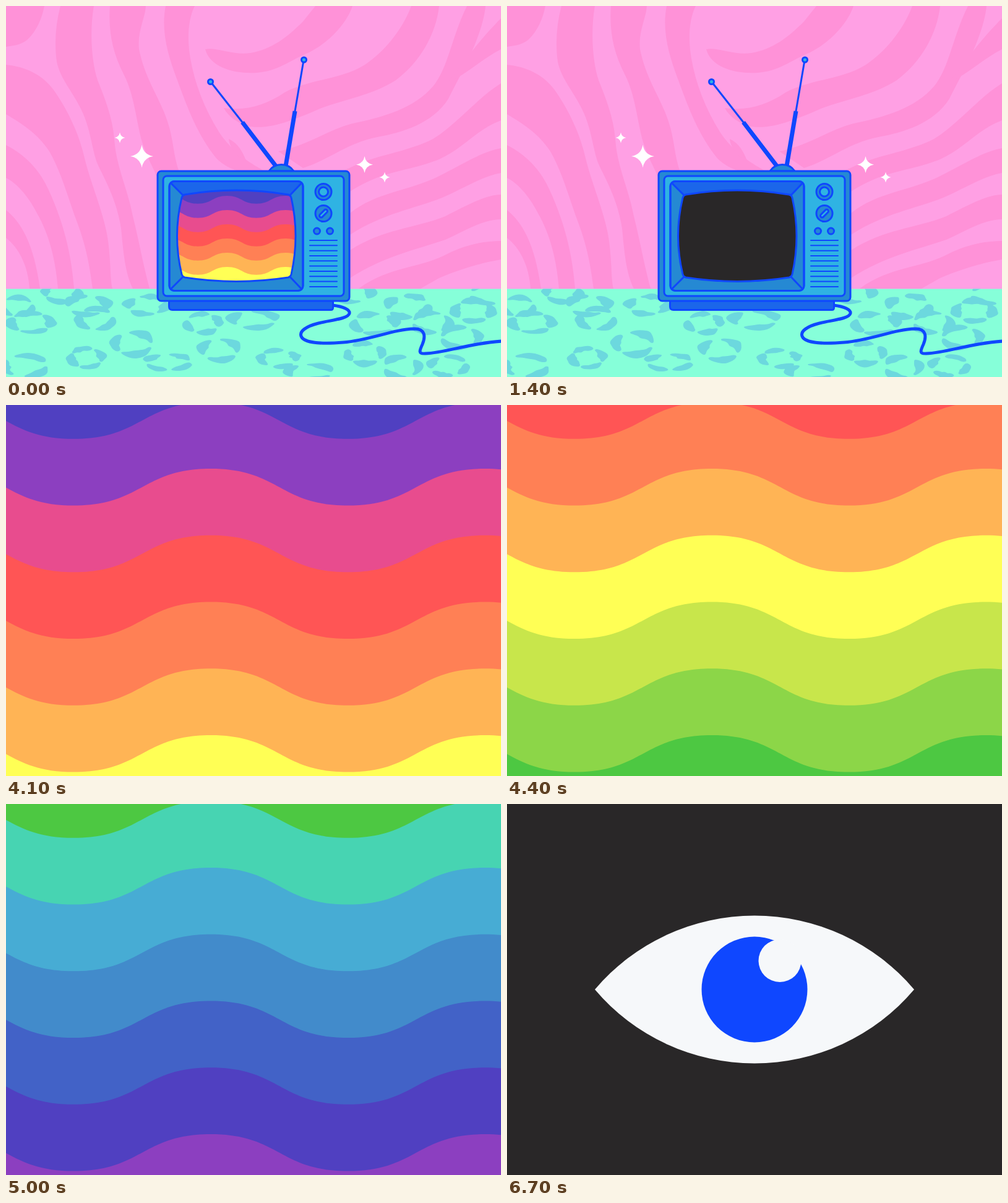
Animation of 800 by 600 pixels, one loop 8200 ms. Source, as an HTML page:

```html
<!DOCTYPE html>
<html lang="en">
<head>
<meta charset="utf-8">
<title>Television</title>
<style>
  html, body { margin: 0; width: 100%; height: 100%; overflow: hidden; background: #292728; }
  svg { display: block; width: 100vw; height: 100vh; }
  .line { fill: none; stroke: #0f47ff; stroke-width: 3; stroke-linecap: round; stroke-linejoin: round; }
  .mid { fill: #2589d3; }
  .light { fill: #2fb3e3; }
  .deep { fill: #1b66ea; }
</style>
</head>
<body>
<svg viewBox="0 0 800 600">
  <defs>
    <path id="glass" d="M289 305Q372 291 456 305Q460 306 461 310Q475 372 461 434Q460 438 456 439Q372 452 289 439Q285 438 284 434Q269 372 284 310Q285 306 289 305Z"/>
    <clipPath id="glassClip"><use href="#glass"/></clipPath>
  </defs>

  <rect width="800" height="600" fill="#ffa0e4"/>
  <g fill="#ff92d8">
    <path d="M0 0H62C58 20 50 40 34 55 22 64 10 64 0 66Z"/>
    <path d="M88 0C80 30 78 60 82 90 88 120 110 140 125 175 138 205 140 240 150 260 165 290 180 320 186 360 190 400 192 430 205 457H232C222 420 215 380 205 340 195 290 178 260 175 215 172 180 160 150 148 120 138 90 135 40 142 0Z"/>
    <path d="M0 95C30 98 60 110 80 140 100 170 118 205 128 250 138 290 160 340 165 380 170 420 168 440 172 457H140C135 420 130 390 115 350 100 310 90 270 70 235 50 205 25 190 0 175Z"/>
    <path d="M0 225C30 240 55 265 70 300 88 340 105 390 110 457H84C80 410 70 370 50 335 35 305 15 285 0 278Z"/>
    <path d="M0 330C25 350 45 385 55 457H38C36 420 20 390 0 375Z"/>
    <path d="M168 0C165 40 172 75 190 110 208 145 210 185 220 220 228 245 238 262 246 280H285C270 250 272 220 262 190 250 150 225 120 215 70 212 40 225 20 226 0Z"/>
    <path d="M258 0C250 40 262 80 275 115 290 155 305 200 335 240 345 255 365 265 380 268H420C395 255 365 235 345 205 320 165 305 125 298 85 292 50 295 20 305 0Z"/>
    <path d="M322 70C340 66 365 80 395 76 430 70 455 50 480 25L500 0H560C550 30 520 60 490 75 455 90 440 105 405 108 370 110 330 100 322 70Z"/>
    <path d="M352 165C390 170 420 160 450 140 490 118 540 120 580 95 610 75 640 40 655 0H700C695 45 670 90 630 120 590 145 550 150 510 165 470 182 430 200 395 195 375 190 360 180 352 165Z"/>
    <path d="M360 215C375 222 382 235 388 250 375 246 362 232 360 215Z"/>
    <path d="M440 235C490 225 520 200 560 190 610 180 660 165 690 130 715 100 720 50 745 0H775C770 50 735 110 715 150 690 190 640 205 600 212 550 222 520 250 480 262Z"/>
    <path d="M712 125C735 100 755 65 800 20V70C770 85 745 110 712 125Z"/>
    <path d="M540 270C590 240 640 240 690 215 730 190 760 150 800 125V185C760 200 740 230 700 248 650 268 610 265 556 300Z"/>
    <path d="M556 335C600 300 650 300 700 275 740 255 770 235 800 230V270C770 275 740 295 705 310 660 328 610 335 556 370Z"/>
    <path d="M556 395C610 360 660 360 710 340 740 325 775 305 800 305V345C770 345 740 365 710 378 660 395 610 405 556 440Z"/>
    <path d="M570 457C620 420 670 425 715 400 745 385 775 380 800 380V410C770 415 735 425 700 440L670 457Z"/>
  </g>
  <path id="sparkles" fill="#fff"/>

  <svg y="457.5" width="800" height="142.5" viewBox="0 457.5 800 142.5">
    <rect y="457" width="800" height="143" fill="#86ffd9"/>
    <path id="spots" fill="#6cd8de"/>
  </svg>

  <path class="line" style="stroke-width:5" d="M528 484C545 486 556 491 555 497C553 506 525 508 505 513C485 518 474 526 477 534C481 545 510 547 545 544C590 540 625 523 660 522C678 522 678 535 673 547C668 558 666 563 678 562C710 561 750 545 802 542"/>

  <g class="line">
    <path d="M331 123L382 188M481 88L467 170"/>
    <path stroke-linecap="butt" style="stroke-width:7;stroke-linecap:butt" d="M382 188L437 260M467 170L452 259"/>
    <circle class="light" cx="330.5" cy="122.5" r="4"/>
    <circle class="light" cx="481.5" cy="87" r="4"/>
    <path class="mid" d="M425 267Q432 256.5 445 256.5T465 267Z"/>
    <path class="deep" d="M263.5 476H528.500V488Q528.500 491.500 525 491.500H269Q263.500 491.500 263.500 486Z"/>
    <rect class="mid" x="245" y="267" width="310" height="210" rx="6"/>
    <rect class="light" x="254" y="275" width="292" height="194" rx="6"/>
    <rect class="mid" x="264" y="283.5" width="216" height="177" rx="8"/>
    <path class="deep" stroke="none" d="M267 286Q269 283.500 272 283.500H472Q475 283.500 477 286L460 306Q372 290 285 306Z"/>
    <path d="M267 287L286 306M477 287L459 306M267 457L286 438M477 457L459 438"/>
    <rect x="264" y="283.5" width="216" height="177" rx="8"/>
    <circle class="mid" cx="513" cy="300.500" r="13"/>
    <circle class="light" cx="513" cy="300.500" r="7.500"/>
    <circle class="mid" cx="513" cy="335.500" r="13"/>
    <rect class="light" x="505" y="332.700" width="16" height="5.600" rx="2.800" transform="rotate(-45 513 335.500)"/>
    <circle class="mid" cx="502.500" cy="364" r="5"/>
    <circle class="mid" cx="523.500" cy="364" r="5"/>
    <path id="grille" style="stroke-width:2"/>
  </g>

  <g clip-path="url(#glassClip)"><g id="small"></g></g>
  <use href="#glass" class="line"/>
  <g id="full"></g>
</svg>

<script>
const NS = "http://www.w3.org/2000/svg";
const DARK = "#292728", WHITE = "#f6f8fa", BLUE = "#0f47ff";
const RAINBOW = ["#5040c1", "#8c3fc0", "#e84c8e", "#ff5555", "#ff8055", "#ffb455", "#ffff55",
                 "#c8e64b", "#8cd648", "#4dc842", "#47d4b2", "#47acd4", "#428bcb", "#4262c7"];
const STEP = 100, SCENE = 4100, DARK_AT = 1400, EYE_AT = 2400;
const byId = id => document.getElementById(id);

function add(parent, tag, attrs = {}) {
  const node = document.createElementNS(NS, tag);
  for (const key in attrs) node.setAttribute(key, attrs[key]);
  return parent.appendChild(node);
}

// Closed curve through the midpoints of a polygon.
function smooth(points) {
  const mid = (p, q) => `${((p[0] + q[0]) / 2).toFixed(1)} ${((p[1] + q[1]) / 2).toFixed(1)}`;
  let d = "M" + mid(points[points.length - 1], points[0]);
  points.forEach((p, i) => {
    d += `Q${p[0].toFixed(1)} ${p[1].toFixed(1)} ${mid(p, points[(i + 1) % points.length])}`;
  });
  return d + "Z";
}

let seed = 11;
const random = () => (seed = (seed * 16807) % 2147483647) / 2147483647;

// One bent, ragged patch on the rim of a rosette.
function patch(cx, cy, rx, ry, from, span) {
  const outer = [], inner = [];
  for (let i = 0; i <= 6; i++) {
    const a = from + span * i / 6;
    const half = (0.08 + 0.22 * Math.sin(Math.PI * i / 6)) * (0.7 + random() * 0.7);
    const at = r => [cx + rx * r * Math.cos(a), cy + ry * r * Math.sin(a)];
    outer.push(at(1 + half));
    inner.unshift(at(1 - half));
  }
  return smooth(outer.concat(inner));
}

function leopard() {
  const centres = [[18, 486], [90, 463], [132, 484], [40, 512], [145, 506], [228, 484], [205, 546],
    [130, 569], [30, 582], [318, 513], [345, 556], [262, 576], [400, 507], [440, 570], [490, 592],
    [596, 514], [560, 464], [650, 486], [688, 512], [755, 493], [735, 536], [580, 562], [640, 584],
    [715, 582], [785, 466]];
  return centres.map(([x, y], i) => {
    const rx = 25 + 10 * random(), ry = 12 + 6 * random(), turn = random() * 6;
    const count = 3 + i % 2;
    let d = "";
    for (let k = 0; k < count; k++)
      d += patch(x, y, rx, ry, turn + k * 2 * Math.PI / count, 4.6 / count + random() * 0.4);
    return d;
  }).join("");
}

function sparkle(x, y, r) {
  const c = r * 0.14;
  return `M${x} ${y - r}Q${x + c} ${y - c} ${x + r} ${y}Q${x + c} ${y + c} ${x} ${y + r}` +
         `Q${x - c} ${y + c} ${x - r} ${y}Q${x - c} ${y - c} ${x} ${y - r}Z`;
}

function wave(k) {
  const half = 221.5, crest = -4.75 + 107.75 * k, trough = crest + 59.6;
  let x = 331 - 4 * half, y = crest;
  let d = `M${x} ${y}`;
  for (let i = 0; i < 8; i++) {
    const next = i % 2 ? crest : trough;
    d += `C${x + half / 2} ${y} ${x + half / 2} ${next} ${x += half} ${next}`;
    y = next;
  }
  return d + "V900H-555Z";
}

function lens(open) {
  const sag = 119.5 * open, r = (258 * 258 + sag * sag) / (2 * sag);
  return `M142 300A${r} ${r} 0 0 1 658 300A${r} ${r} 0 0 1 142 300Z`;
}

// Builds one broadcast picture and returns the function that updates it.
function picture(parent, name, waveScale, eyeScale, x, y) {
  const layer = scale => add(parent, "g", {
    transform: `translate(${x} ${y}) scale(${scale}) translate(-400 -300)`
  });
  add(layer(1), "rect", { width: 800, height: 600, fill: DARK });

  const waves = layer(waveScale);
  const bands = [add(waves, "rect", { x: -400, y: -300, width: 1600, height: 1200 })];
  for (let k = 0; k < 6; k++) bands.push(add(waves, "path", { d: wave(k) }));

  const eye = layer(eyeScale);
  const clip = add(add(eye, "clipPath", { id: name + "Lid" }), "path");
  const white = add(eye, "path", { fill: WHITE });
  const iris = add(eye, "g", { "clip-path": `url(#${name}Lid)` });
  add(iris, "circle", { cx: 400, cy: 300, r: 85.5, fill: BLUE });
  add(iris, "circle", { cx: 441, cy: 253.5, r: 34.5, fill: WHITE });

  return time => {
    const step = Math.floor(time / STEP);
    waves.style.display = time < DARK_AT ? "" : "none";
    eye.style.display = time >= EYE_AT ? "" : "none";
    bands.forEach((band, i) => band.setAttribute("fill", RAINBOW[(i + step) % RAINBOW.length]));
    if (time >= EYE_AT) {
      const d = lens(Math.min(1, (step - EYE_AT / STEP + 1) / 3));
      white.setAttribute("d", d);
      clip.setAttribute("d", d);
    }
  };
}

byId("spots").setAttribute("d", leopard());
byId("sparkles").setAttribute("d",
  sparkle(219.5, 243, 18.5) + sparkle(184, 213, 8.5) + sparkle(579.5, 256.5, 13.5) + sparkle(612, 277, 8.5));
byId("grille").setAttribute("d",
  Array.from({ length: 10 }, (_, i) => `M491 ${(379 + i * 8.33).toFixed(1)}H535`).join(""));

const full = byId("full");
const drawSmall = picture(byId("small"), "small", 0.2136, 0.24, 372, 372);
const drawFull = picture(full, "full", 1, 1, 400, 300);

function render(time) {
  const t = time % (2 * SCENE), close = t >= SCENE;
  full.style.display = close ? "" : "none";
  (close ? drawFull : drawSmall)(t % SCENE);
}

const start = performance.now();
function tick() {
  render(performance.now() - start);
  requestAnimationFrame(tick);
}
render(0);
requestAnimationFrame(tick);
</script>
</body>
</html>
```
